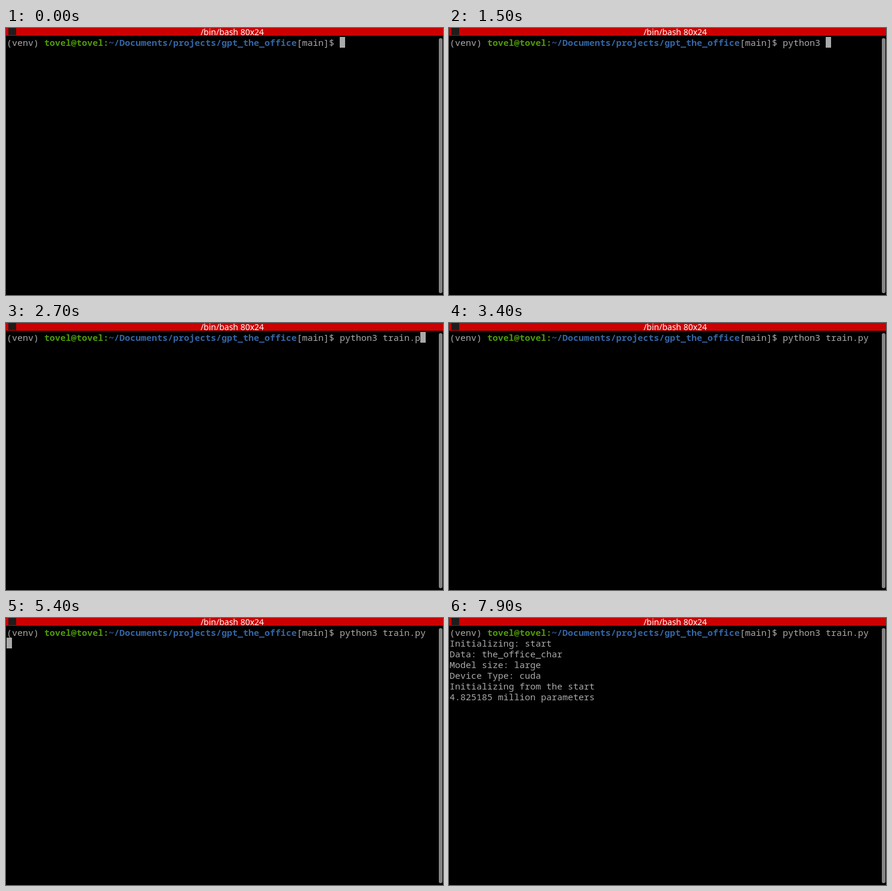
An HTML page that plays this animation: 732 px wide and 448 px high, repeating every 8000 ms.

```html
<!DOCTYPE html>
<html lang="en">
<head>
<meta charset="utf-8">
<style>
  html, body { margin: 0; width: 732px; height: 448px; overflow: hidden; background: #000; }
  body { position: relative; }
  div, pre, i { position: absolute; margin: 0; }
  #bar { width: 732px; height: 13px; background: #c00; }
  #title {
    left: 26px; top: -3px; width: 706px; text-align: center; white-space: pre;
    font: 14px/20px "Noto Sans", sans-serif; color: #fff;
  }
  #icon { left: 4px; top: 0; width: 13px; height: 12px; background: #201c1c; }
  #scroll { left: 725px; top: 17px; width: 6px; height: 428px; border-radius: 3px; background: #858585; }
  #screen { left: 1px; top: 15px; font: 15px/18px "Noto Sans Mono", monospace; color: #aaa; }
  #cursor { width: 9px; height: 18px; background: #aaa; }
  b { font-weight: 700; }
  .user { color: #4e9a06; }
  .path { color: #3465a4; }
</style>
</head>
<body>
<div id="bar"></div>
<div id="title">/bin/bash 80x24</div>
<div id="icon"></div>
<div id="scroll"></div>
<i id="cursor"></i>
<pre id="screen">(venv) <b class="user">tovel@tovel:</b><b class="path">~/Documents/projects/gpt_the_office</b>[main]$ <span id="typed"></span>
<span id="output"></span></pre>
<script>
const LOOP = 8000, BLINK = 600, PROMPT = 62, ENTER = 3690;
const command = "python3 train.py";
const keys = [190, 290, 390, 490, 590, 740, 990, 1290, 1590, 1740, 1840, 1940, 2090, 2390, 2590, 2740];
const lines = [
  [5690, "Initializing: start"],
  [5690, "Data: the_office_char"],
  [5690, "Model size: large"],
  [5690, "Device Type: cuda"],
  [5890, "Initializing from the start"],
  [6090, "4.825185 million parameters"]
];
const [typed, output, cursor] = ["typed", "output", "cursor"].map(id => document.getElementById(id));

function draw(t) {
  const count = keys.filter(k => k <= t).length;
  const shown = lines.filter(([at]) => at <= t).map(([, text]) => text);
  const entered = t >= ENTER;
  typed.textContent = command.slice(0, count);
  output.textContent = shown.join("\n");

  // The blink restarts with every key press
  const lastKey = entered ? ENTER : count ? keys[count - 1] : 0;
  const col = entered ? 0 : PROMPT + count;
  const row = entered ? 1 + shown.length : 0;
  cursor.style.left = 1 + col * 9 + "px";
  cursor.style.top = 15 + row * 18 + "px";
  cursor.style.visibility = (t - lastKey) % (2 * BLINK) < BLINK ? "visible" : "hidden";
}

const start = performance.now();
function tick(now) {
  draw(Math.max(0, now - start) % LOOP);
  requestAnimationFrame(tick);
}
draw(0);
requestAnimationFrame(tick);
</script>
</body>
</html>
```
